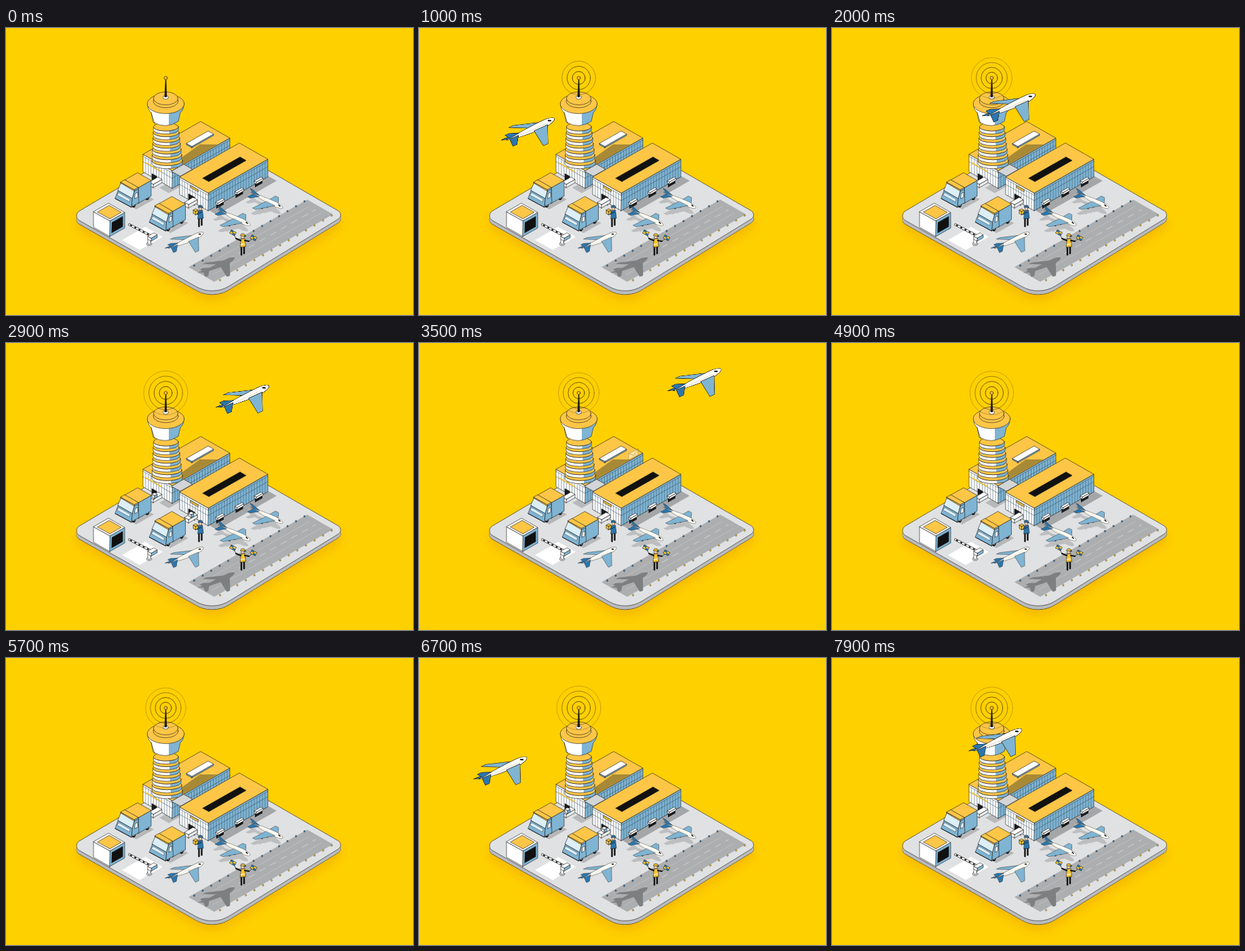
Write an HTML page with a canvas that moves like this. It is 600 px wide and 424 px high and loops after 8000 ms.

```html
<!DOCTYPE html>
<html lang="en">
<head>
<meta charset="utf-8">
<title>Airport</title>
<style>
html, body { margin: 0; width: 100%; height: 100%; overflow: hidden; background: #ffd000; }
canvas { display: block; width: 600px; height: 424px; }
</style>
</head>
<body>
<canvas id="stage"></canvas>
<script>
const W = 600, H = 424, LOOP = 8000, ISO = 0.57;
const INK = '#1a1a1a', BLUE = '#7fb4d3', DEEP = '#2b76ad', GOLD = '#fdc646';
const YELLOW = '#f7c52f', WHITE = '#fff', PALE = '#dceef6', SKIN = '#f3cfaa';
const dpr = Math.max(1, window.devicePixelRatio || 1);
const clamp = v => Math.max(0, Math.min(1, v));
const mix = (a, b, k) => a + (b - a) * k;

function layer(w, h, res, canvas = document.createElement('canvas')) {
  canvas.width = w * res;
  canvas.height = h * res;
  const ctx = canvas.getContext('2d');
  ctx.scale(res, res);
  ctx.lineJoin = ctx.lineCap = 'round';
  return ctx;
}

const view = layer(W, H, dpr, document.getElementById('stage'));
let g;

function paint(fill, line = INK, w = 0.6) {
  if (fill) { g.fillStyle = fill; g.fill(); }
  if (line) { g.strokeStyle = line; g.lineWidth = w; g.stroke(); }
}
function poly(pts, fill, line, w) {
  g.beginPath();
  for (const [x, y] of pts) g.lineTo(x, y);
  g.closePath();
  paint(fill, line, w);
}
function seg(x1, y1, x2, y2, color = INK, w = 0.6) {
  g.beginPath();
  g.moveTo(x1, y1);
  g.lineTo(x2, y2);
  paint(null, color, w);
}
function oval(x, y, rx, ry, fill, line, w) {
  g.beginPath();
  g.ellipse(x, y, rx, ry, 0, 0, 7);
  paint(fill, line, w);
}
function at(x, y, size, draw) {
  g.save();
  g.translate(x, y);
  g.scale(size, size);
  draw();
  g.restore();
}

// Isometric parts: (x, y) is the nearest corner, a runs left, b runs right
function tile(x, y, a, b, fill, line) {
  poly([[x, y], [x + b, y - b * ISO], [x + b - a, y - (a + b) * ISO], [x - a, y - a * ISO]], fill, line);
}
function face(x, y, run, h, fill, line) {
  const y2 = y - Math.abs(run) * ISO;
  poly([[x, y], [x + run, y2], [x + run, y2 + h], [x, y + h]], fill, line);
}
function box(x, y, a, b, h, top, left, right) {
  face(x, y, -a, h, left);
  face(x, y, b, h, right);
  tile(x, y, a, b, top);
}
function mullions(x, y, run, h) {
  const slope = Math.abs(run) * ISO, n = Math.round(Math.abs(run) / 4);
  for (let i = 1; i < n; i++) {
    const px = x + run * i / n, py = y - slope * i / n;
    seg(px, py + 3, px, py + h, '#2d4958', 0.5);
  }
  for (const d of [3, 11]) seg(x, y + d, x + run, y - slope + d, '#2d4958', 0.5);
}
function hall(x, y, a, b) {
  box(x, y, a, b, 26, GOLD, WHITE, BLUE);
  mullions(x, y, -a, 26);
  mullions(x, y, b, 26);
}

function slab(y, fill, line) {
  g.beginPath();
  g.moveTo(200, 216 + y);
  g.arcTo(298, 158 + y, 400, 223 + y, 40);
  g.arcTo(500, 276 + y, 400, 337 + y, 7);
  g.arcTo(305, 396 + y, 200, 337 + y, 48);
  g.arcTo(96, 277.5 + y, 200, 216 + y, 8);
  g.closePath();
  paint(fill, line);
}

function ground() {
  g.save();
  g.shadowColor = 'rgba(226,150,0,.4)';
  g.shadowBlur = 16 * dpr;
  g.shadowOffsetY = 7 * dpr;
  slab(5.5, '#b9bbbd');
  g.restore();
  for (let dy = 5; dy > 0; dy--) slab(dy, '#b9bbbd', null);
  slab(0, '#e0e1e2');
  tile(197, 328, 26, 34, WHITE, null);
  tile(307, 375, 38, 175, '#adaeaf', null);
  for (const k of [0.27, 0.5, 0.73]) {
    const x = 307 - 38 * k, y = 375 - 38 * ISO * k;
    g.setLineDash(k === 0.5 ? [9, 9] : []);
    seg(x + 8, y - 8 * ISO, x + 168, y - 168 * ISO, '#c8cacb', k === 0.5 ? 1.1 : 0.6);
  }
  g.setLineDash([]);
  for (let i = 0; i < 14; i++) {
    if (i !== 5) oval(277.5 + i * 12.5, 351 - i * 7.3, 1.1, 1.4, DEEP, '#444', 0.5);
    oval(315.5 + i * 12.66, 372.5 - i * 7.35, 1.1, 1.4, YELLOW, '#444', 0.5);
  }
  tile(311, 276, 13, 88, '#a4a6a8', null);
  tile(240, 244, 14, 22, '#b7b9bb', null);
}

function buildings() {
  hall(245, 211, 43, 85);
  poly([[258, 192], [286, 172], [312, 172], [256, 204]], '#a88935', null);
  box(274, 175, 8, 32, 2, WHITE, BLUE, BLUE);
  face(222, 219, -7, 13, INK);
  seg(206, 199, 229, 212, YELLOW, 1.6);
  tile(257, 219, 13, 18, '#d3d5d6');
  hall(298, 244, 42, 88);
  tile(299, 227, 9, 55, '#111');
  face(283, 239, -11, 3, YELLOW);
  face(278, 250, -9, 12, INK);
  for (let i = 0; i < 3; i++) {
    const x = 312 + i * 28.5, y = 259 - i * 15.7;
    face(x - 2, y, 11, 8, INK, null);
    box(x, y, 3, 10, 3, WHITE, WHITE, WHITE);
  }
}

function ring(x, y, rx, h) {
  const ry = rx * 0.33, path = new Path2D();
  path.ellipse(x, y + h, rx, ry, 0, 0, Math.PI);
  path.ellipse(x, y, rx, ry, 0, Math.PI, 0, true);
  path.closePath();
  halved(path, x + rx * 0.25);
  oval(x, y, rx, ry, GOLD);
}
// White on the lit side, blue right of the given x
function halved(path, x) {
  g.fillStyle = WHITE;
  g.fill(path);
  g.save();
  g.clip(path);
  g.fillStyle = BLUE;
  g.fillRect(x, 90, 40, 130);
  g.restore();
  g.strokeStyle = INK;
  g.lineWidth = 0.6;
  g.stroke(path);
}

function tower() {
  for (let i = 6; i >= 0; i--) {
    const y = 146 + i * 8.3, rx = 18.5 + i * 0.65, x = 235.8 + i * 0.3;
    g.fillStyle = BLUE;
    g.fillRect(x - rx + 3, y, rx * 2 - 6, 10);
    ring(x, y, rx, 4.5);
  }
  halved(new Path2D('M208.5 112 Q209 121 214 125 L217 139 Q235 150 254 138 L257 125 Q262 121 262.5 112 Z'), 240);
  seg(214, 125, 219, 141);
  oval(235.5, 112, 27.3, 14.5, GOLD);
  for (const [y, k] of [[108, 1], [104, 0.98]]) oval(235.5, y, 18.5 * k, 9.8 * k, GOLD);
  oval(235.5, 102.5, 4, 2.8, WHITE);
  poly([[235, 76], [236, 76], [237, 102], [234, 102]], '#111', '#111', 0.4);
  oval(235.5, 73.8, 2.5, 2.5, '#f3b62e');
}

function truck() {
  tile(192, 268, 30, 26, '#b5b7b9', null);
  for (const [x, y] of [[188, 261], [208, 250]]) {
    oval(x, y, 2.8, 4, '#111');
    oval(x + 0.7, y, 1.2, 1.9, PALE, null);
  }
  box(195, 236, 20, 19, 23, GOLD, BLUE, BLUE);
  face(189, 239, -20, 4, GOLD);
  tile(189, 239, 20, 6, GOLD);
  poly([[189, 241], [195, 238], [196, 258], [185, 264], [186, 252]], BLUE);
  poly([[169, 229], [189, 241], [186, 252], [165, 240]], PALE);
  poly([[165, 240], [186, 252], [185, 265], [161, 252]], BLUE);
  poly([[166, 243], [183, 253], [182, 257], [164, 247]], PALE, INK, 0.4);
  seg(161, 252, 185, 265, INK, 1);
  face(190, 245, 4, 7, WHITE);
}

function gate() {
  box(153, 285, 24, 22, 23, WHITE, WHITE, BLUE);
  tile(153, 282, 18, 17, GOLD);
  face(156, 287.5, 16, 15, '#111');
  seg(182, 290.5, 212, 306, INK, 3.6);
  seg(182, 290.5, 212, 306, WHITE, 2.5);
  g.setLineDash([3, 4]);
  g.lineCap = 'butt';
  seg(183, 291, 212, 306, '#222', 2.2);
  g.setLineDash([]);
  g.lineCap = 'round';
  oval(211, 319, 4, 2.4, WHITE);
  seg(211, 312, 211, 318, INK, 4.6);
  seg(211, 312, 211, 318, WHITE, 3.4);
  box(214, 310.5, 5, 9, 4.5, WHITE, WHITE, BLUE);
}

// Aircraft with its nose at the origin; k is the heading's slope,
// side the wing direction, flat one colour for a shadow
function jet(k, side, flat) {
  const p = (u, v, z = 0) => [u + side * 25.5 * v, k * u + 13.5 * v - z];
  const fill = (pts, color) => poly(pts, flat || color, flat ? null : INK);
  const wing = s => fill([p(-14, s * 0.15), p(-35, s, -7), p(-42, s, -7), p(-34, s * 0.15)], BLUE);
  const stab = s => fill([p(-53, 0), p(-64, s * 0.34, -4), p(-70, s * 0.34, -4), p(-66, 0)], DEEP);
  const engines = s => {
    for (const v of [0.42, 0.68]) {
      const [x, y] = p(-16 - v * 19, s * v, -7 * v - 1);
      oval(x, y, 2, 1.5, flat || '#24303a', null);
    }
  };
  engines(-1);
  wing(-1);
  stab(-1);
  g.beginPath();
  g.moveTo(...p(-71, 0, 1));
  g.bezierCurveTo(...p(-58, 0, 3), ...p(-30, 0, 6), ...p(-14, 0, 6));
  g.bezierCurveTo(...p(-5, 0, 5), ...p(0, 0, 3), ...p(0, 0));
  g.bezierCurveTo(...p(0, 0, -3), ...p(-8, 0, -6), ...p(-16, 0, -6));
  g.bezierCurveTo(...p(-34, 0, -6), ...p(-60, 0, -3), ...p(-71, 0, 1));
  paint(flat || '#fffdf5', flat ? null : INK);
  if (!flat) {
    seg(...p(-52, 0, -1), ...p(-14, 0, -1), '#b8b09a', 0.4);
    seg(...p(-9, 0, 2), ...p(-6, 0, 0.5), '#111', 2.2);
  }
  fill([p(-73, 0, 9), p(-67, 0, 9), p(-52, 0, 3), p(-66, 0, 1)], DEEP);
  engines(1);
  wing(1);
  stab(1);
}

function person(x, y, coat) {
  for (const d of [-2, 2]) seg(x + d, y + 6, x + d, y + 17 - d / 2, '#111', 2.4);
  poly([[x - 3, y - 5], [x + 3, y - 6], [x + 4.5, y + 6], [x - 3.5, y + 7]], coat);
  oval(x, y - 8.5, 2.3, 2.8, SKIN, INK, 0.5);
  poly([[x - 3.5, y - 10], [x - 2, y - 13], [x + 2, y - 13], [x + 3.5, y - 10]], coat);
}
function arm(x, y, ex, ey, fx, fy) {
  seg(x, y, ex, ey, '#111', 2);
  seg(ex, ey, fx, fy, '#111', 0.7);
  at(fx, fy, 1, () => {
    g.rotate(0.5);
    g.fillStyle = INK;
    g.fillRect(-4.5, -3, 9, 6);
    for (let i = 0; i < 4; i++) {
      g.fillStyle = i % 3 ? YELLOW : DEEP;
      g.fillRect(i % 2 ? 0 : -4, i > 1 ? 0 : -2.5, 4, 2.5);
    }
  });
}
function crew() {
  person(349, 317, YELLOW);
  seg(346, 320, 352, 319, WHITE, 1);
  arm(346, 314, 339, 311, 334.5, 302.5);
  arm(352, 314, 358, 315, 365, 310);
  person(286.5, 275, DEEP);
  box(279.5, 271, 3.5, 3.5, 5, YELLOW, YELLOW, YELLOW);
  seg(288, 272, 282, 275, '#174f7b', 2);
}

function buildScene() {
  g = layer(W, H, dpr);
  g.fillStyle = '#ffd000';
  g.fillRect(0, 0, W, H);
  ground();
  buildings();
  for (const [x, y] of [[217, 231], [269, 261]]) box(x, y, 6, 13, 5, WHITE, WHITE, '#e9eef0');
  tower();
  truck();
  at(50.5, 35, 1, truck);
  gate();
  for (const [x, y] of [[360, 291], [408, 265.5]]) {
    at(x - 3, y + 8, 0.66, () => jet(0.47, -1, '#bcbec0'));
    at(x, y, 0.66, () => jet(0.47, -1));
  }
  at(337, 340, 0.7, () => jet(-0.45, 1, '#7d7f81'));
  at(291, 303, 0.72, () => jet(-0.45, 1));
  crew();
  return g.canvas;
}

function buildJet() {
  g = layer(90, 60, dpr * 2);
  g.translate(80, 8);
  jet(-0.45, 1);
  return g.canvas;
}

const scene = buildScene(), sprite = buildJet();

function ripples(t) {
  const sway = -1.5 * Math.cos((t - 5600) / 1900 * Math.PI * 2);
  for (let i = 0; i < 4; i++) {
    g.globalAlpha = clamp((t - 50 - i * 360) / 300) * (1 - i * i * 0.06);
    const r = 9 + i * 7.4 + sway * (0.4 + i * 0.2);
    oval(235.5, 73.8, r, r, null, '#3a2d00', 0.8 - i * 0.07);
  }
  g.globalAlpha = 1;
}

// Every 3.8 s a parcel leaves each door for its truck
function parcels(t) {
  const k = ((t + 1350) % 3800) / 900;
  if (k > 1) return;
  g.globalAlpha = clamp(Math.min(k, 1 - k) * 8);
  for (const [x, y] of [[225, 222], [279, 250]])
    box(x - 12 * k, y + 7 * k, 4, 4, 4.5, WHITE, '#dfe7eb', BLUE);
  g.globalAlpha = 1;
}

// Letters dropping through the roof slot: x, size, start time
const letters = [[319, 1, 3610], [337, 0.7, 3530], [316, 0.75, 3370], [346, 0.55, 3550]];
function mail(t) {
  g.save();
  g.beginPath();
  for (const [x, y] of [[270, 0], [370, 0], [370, 186], [299, 227], [270, 210]]) g.lineTo(x, y);
  g.clip();
  for (const [x, size, start] of letters) {
    const k = (t - start) / 700;
    if (k < 0 || k > 1.3) continue;
    g.globalAlpha = clamp(k * 2.5);
    at(x, 207 - (x - 319) * ISO - 46 * (1 - k * k), size, () => {
      face(9, -10.5, 0, 0);
      poly([[-9.5, -1], [9, -10.5], [9, 1], [-9.5, 11]], WHITE);
      seg(-9.5, -1, 1, 2);
      seg(1, 2, 9, -10.5);
    });
  }
  g.restore();
}

function flight(t) {
  const u = t < 4300 ? t : t - 6100, s = (u - 600) / 1000;
  const alpha = Math.min(clamp((u - 120) / 350), clamp((4220 - u) / 400));
  if (alpha <= 0) return;
  const bend = s * (s - 1.4);
  const x = 159 + 100.5 * s - 1.2 * bend, y = 148 - 35 * s - 1.57 * bend;
  g.globalAlpha = alpha;
  g.drawImage(sprite, x - 80, y - 8, 90, 60);
  g.globalAlpha = 1;
}

function frame(now) {
  const t = now % LOOP;
  g = view;
  g.drawImage(scene, 0, 0, W, H);
  parcels(t);
  mail(t);
  ripples(t);
  flight(t);
  requestAnimationFrame(frame);
}
requestAnimationFrame(frame);
</script>
</body>
</html>
```
